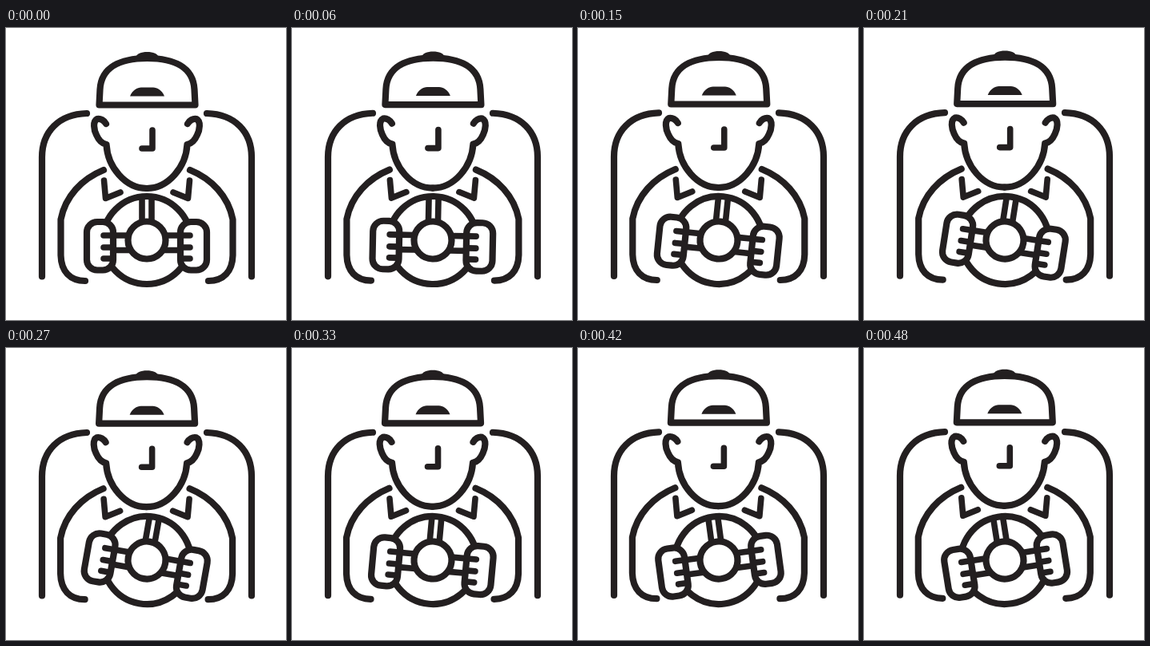
An HTML page for the animation above (0.61 s loop, 350 px wide and 366 px high).

```html
<!DOCTYPE html>
<html lang="en">
<head>
<meta charset="utf-8">
<title>Driver</title>
<style>
  html, body { margin: 0; width: 100%; height: 100%; overflow: hidden; background: #fff; }
  svg { display: block; width: 350px; height: 366px; }
  .ink { fill: none; stroke: #231f20; stroke-width: 8.2; stroke-linecap: round; stroke-linejoin: round; }
  .solid { fill: #231f20; stroke: none; }
  .paper { fill: #fff; }
  .fine { stroke-width: 7.6; }
</style>
</head>
<body>
<svg viewBox="0 0 350 366" class="ink">
  <defs>
    <path id="seat" d="M101 107C66 108 45 130 45 162V311.500"/>
    <g id="side">
      <path d="M122 178C95 189 74 211 68.500 240V285C69 305 80 317 99 317"/>
      <path d="M122.500 191L124.500 213.500L143 206" class="fine"/>
      <path d="M125 120C123 116 118 113 114 114C108 117 110 128 113 134C116 141 120 145 125.500 146C127 174 149 201 176 201"/>
    </g>
    <g id="hand">
      <path class="fine" d="M134 260H153M134 278.500H155"/>
      <rect class="paper" x="101" y="243" width="33" height="60.500" rx="13"/>
      <path class="fine" d="M122 260H133M122 275H133M122 289H133"/>
    </g>
  </defs>

  <g id="chair">
    <use href="#seat"/>
    <use href="#seat" transform="matrix(-1 0 0 1 352 0)"/>
  </g>

  <g id="body">
    <use href="#side"/>
    <use href="#side" transform="matrix(-1 0 0 1 352 0)"/>
    <path d="M183 128V151H170" class="fine"/>
    <path d="M116.500 96.500L117.500 77C119 49 143 38 176.500 38S234 49 235.500 77L236.500 96.500Z"/>
    <path class="solid" d="M161.500 38C163 32 169 30 176.500 30S190 32 191.500 38Z"/>
    <path class="solid" d="M155 85.500C158 78 164 74.500 169 74.500H184C189 74.500 195 78 198 85.500Z"/>
  </g>

  <g id="wheel">
    <circle cx="176" cy="266" r="55"/>
    <path class="fine" d="M170 213V242M182 213V242" stroke-linecap="butt"/>
    <use href="#hand"/>
    <use href="#hand" transform="matrix(-1 0 0 1 352 0)"/>
    <circle class="paper" cx="176" cy="266" r="23.500"/>
  </g>
</svg>
<script>
  const LOOP = 610, STEP = 30, LAST = 480;
  const RIGHT_AT = 270, LEFT_AT = 450, RIGHT = 10, LEFT = -9;
  const place = (id, transform) => document.getElementById(id).setAttribute('transform', transform);

  function ease(from, to, p) {
    return from + (to - from) * (1 - Math.cos(Math.PI * Math.min(p, 1))) / 2;
  }

  function steering(t) {
    return t < RIGHT_AT
      ? ease(0, RIGHT, t / RIGHT_AT)
      : ease(RIGHT, LEFT, (t - RIGHT_AT) / (LEFT_AT - RIGHT_AT));
  }

  function draw(now) {
    const t = Math.min(LAST, Math.floor(now % LOOP / STEP) * STEP);
    const lift = t / LAST;
    place('chair', `translate(0 ${-1.8 * lift})`);
    place('body', `translate(${-0.7 * lift} ${-3.2 * lift})`);
    place('wheel', `rotate(${steering(t)} 176 266)`);
    requestAnimationFrame(draw);
  }
  draw(performance.now());
</script>
</body>
</html>
```
